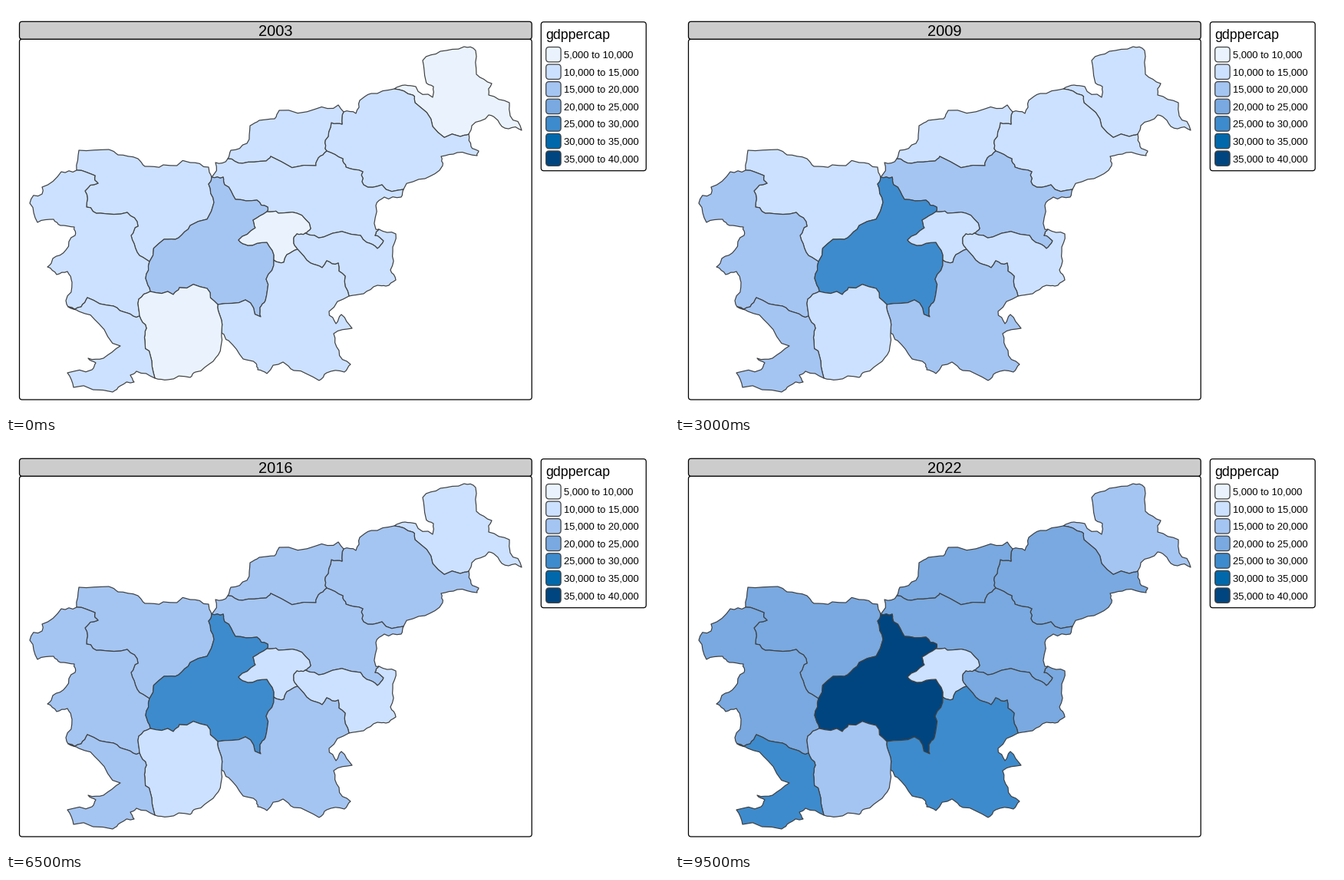
A matplotlib script that plays this animation: 864 by 533 pixels, repeating every 10000 ms.

```python
import numpy as np
import matplotlib.pyplot as plt
from matplotlib.animation import FuncAnimation
from matplotlib.patches import FancyBboxPatch, Polygon

W, H, DPI = 864, 533, 72  # at 72 dpi one point is one pixel
FIRST_YEAR, YEARS = 2003, 20
COLORS = ["#EAF3FD", "#CCE1FF", "#A4C5F2", "#79A9E0", "#3D8BCD", "#0068AB", "#00457F"]
LINE = "#404040"

plt.rcParams["font.family"] = "Liberation Sans"
plt.rcParams["text.hinting"] = "force_autohint"
rng = np.random.default_rng(4)
borders = []


def roughen(pts, levels=2, strength=0.09):
    """Fractal coastline: push the middle of every segment sideways."""
    for _ in range(levels):
        step = np.diff(pts, axis=0)
        sideways = step[:, ::-1] * (-1, 1)
        mid = pts[:-1] + step / 2 + sideways * rng.normal(0, strength, (len(step), 1))
        fine = np.empty((2 * len(pts) - 1, 2))
        fine[::2], fine[1::2] = pts, mid
        pts = fine
    return pts


def border(sides, *keys):
    """Line between two regions ('-' is abroad) through a few key points."""
    borders.append((sides, roughen(np.array(keys, float))))


def outline(region):
    """Chain all borders of a region into one ring."""
    parts = [pts for sides, pts in borders if region in sides]
    ring = parts.pop(0)
    while parts:
        for i, pts in enumerate(parts):
            if np.allclose(pts[-1], ring[-1]):
                pts = pts[::-1]
            if np.allclose(pts[0], ring[-1]):
                ring = np.vstack([ring, pts[1:]])
                del parts[i]
                break
        else:
            raise ValueError(f"open border around {region}")
    return ring


# Outer borders
border("A-", (506, 108), (520, 103), (534, 105), (556, 119), (557, 105), (547, 97),
       (543, 71), (566, 59), (597, 53), (612, 58), (613, 89), (633, 101), (629, 116),
       (656, 126), (657, 143), (672, 162), (655, 160), (641, 149), (629, 142),
       (607, 156), (603, 167))
border("B-", (603, 167), (606, 183), (616, 189), (614, 195), (588, 191), (567, 196),
       (569, 208), (546, 225), (518, 239))
border("B-", (440, 138), (456, 140), (461, 123), (476, 114), (506, 108))
border("C-", (289, 199), (293, 188), (314, 179), (318, 156), (330, 149), (350, 147),
       (356, 136), (404, 134), (433, 129), (440, 138))
border("D-", (268, 223), (273, 204), (289, 199))
border("D-", (518, 239), (515, 249), (493, 249), (482, 260), (482, 291), (486, 291))
border("E-", (92, 214), (95, 188), (134, 187), (146, 194), (172, 199), (181, 209),
       (205, 207), (240, 204), (264, 210), (268, 223))
border("F-", (81, 392), (78, 384), (86, 360), (80, 346), (66, 350), (54, 340),
       (61, 329), (78, 318), (90, 299), (89, 288), (71, 286), (62, 278), (41, 282),
       (31, 257), (47, 245), (47, 236), (72, 216), (92, 214))
border("I-", (486, 291), (508, 297), (504, 320), (501, 344), (508, 357), (495, 365),
       (484, 364), (466, 375), (447, 378))
border("J-", (447, 378), (421, 398), (430, 414), (437, 402), (451, 420), (427, 427),
       (434, 449), (449, 467), (441, 477), (418, 478), (408, 488), (375, 475),
       (361, 464), (340, 479), (328, 474), (326, 466), (309, 460), (290, 436), (281, 426))
border("K-", (281, 426), (280, 444), (270, 463), (247, 477), (240, 484), (211, 487),
       (194, 485))
border("L-", (194, 485), (170, 476), (162, 481), (167, 490), (149, 495), (139, 503),
       (88, 497), (80, 478), (112, 474), (117, 465), (107, 459), (127, 459), (149, 443),
       (121, 414), (95, 398), (81, 392))

# Inner borders
border("AB", (506, 108), (530, 116), (533, 126), (556, 157), (592, 170), (603, 167))
border("BD", (518, 239), (490, 233), (466, 233), (465, 216), (443, 210), (439, 199),
       (418, 189))
border("BC", (418, 189), (416, 175), (424, 152), (438, 154), (440, 138))
border("CD", (289, 199), (308, 205), (339, 202), (345, 196), (404, 208), (407, 198),
       (418, 189))
border("DG", (268, 223), (283, 223), (285, 233), (299, 252), (327, 253), (341, 262),
       (340, 268))
border("DH", (340, 268), (355, 270), (379, 270), (397, 290), (390, 296))
border("DI", (390, 296), (414, 301), (462, 299), (470, 308), (484, 316), (492, 306),
       (481, 299), (486, 291))
border("HI", (390, 296), (379, 297), (375, 306), (380, 317))
border("HJ", (380, 317), (366, 324), (362, 334), (349, 331))
border("GH", (340, 268), (322, 279), (325, 289), (303, 305), (315, 312), (340, 308),
       (349, 331))
border("IJ", (380, 317), (397, 335), (412, 341), (418, 332), (433, 335), (442, 352),
       (447, 378))
border("GJ", (349, 331), (339, 356), (338, 384), (331, 393), (332, 405), (312, 383),
       (276, 389))
border("JK", (281, 426), (279, 404), (276, 389))
border("GK", (188, 372), (218, 376), (226, 367), (262, 368), (276, 389))
border("FK", (188, 372), (173, 382), (174, 404))
border("KL", (174, 404), (183, 420), (181, 436), (188, 455), (194, 485))
border("FL", (81, 392), (98, 392), (106, 380), (140, 391), (158, 400), (174, 404))
border("EF", (92, 214), (116, 221), (120, 231), (103, 241), (105, 262), (123, 270),
       (158, 269), (172, 287), (163, 299), (171, 321), (187, 333))
border("EG", (268, 223), (264, 232), (271, 256), (240, 286), (225, 302), (206, 304),
       (187, 333))
border("FG", (187, 333), (182, 355), (188, 372))

# Class of each region in the first year, then the years it rises and falls by one
HISTORY = {
    "A": (0, [2006, 2019], []),
    "B": (1, [2008, 2014, 2021], [2009]),
    "C": (1, [2016, 2022], []),
    "D": (1, [2007, 2019, 2021], [2020]),
    "E": (1, [2008, 2013, 2019, 2021], [2009, 2020]),
    "F": (1, [2007, 2019, 2021], [2020]),
    "G": (2, [2005, 2007, 2018, 2022], []),
    "H": (0, [2004], []),
    "I": (1, [2017, 2022], []),
    "J": (1, [2006, 2017, 2022], []),
    "K": (0, [2004, 2017], []),
    "L": (1, [2005, 2008, 2017, 2022], [2009]),
}


def income_class(region, year):
    start, rises, falls = HISTORY[region]
    return start + sum(year >= y for y in rises) - sum(year >= y for y in falls)


fig = plt.figure(figsize=(W / DPI, H / DPI), dpi=DPI, facecolor="white")
ax = fig.add_axes([0, 0, 1, 1])
ax.set(xlim=(0, W), ylim=(H, 0))
ax.axis("off")


def box(x0, y0, x1, y1, fill="white", edge="black", radius=3.5):
    ax.add_patch(FancyBboxPatch((x0, y0), x1 - x0, y1 - y0, fc=fill, ec=edge, lw=1.25,
                                boxstyle=f"round,pad=0,rounding_size={radius}"))


box(17.5, 43.2, 685.2, 513)
box(17.5, 20.3, 685.2, 43.2, fill="#CCCCCC")
year_label = ax.text(351, 39, "", size=20, ha="center", va="baseline")

box(697.3, 20.8, 834.2, 214.7)
ax.text(703.5, 43, "gdppercap", size=17.8, va="baseline")
for k, color in enumerate(COLORS):
    y = 63.2 + 22.57 * k
    box(703.7, y - 9.7, 723.1, y + 9.7, color, LINE, 4)
    low = 5000 * (k + 1)
    ax.text(727.3, y + 4.5, f"{low:,} to {low + 5000:,}", size=13, va="baseline")

regions = {}
for name in HISTORY:
    regions[name] = ax.add_patch(
        Polygon(outline(name), closed=True, ec=LINE, lw=1.2, joinstyle="round"))


def update(i):
    year = FIRST_YEAR + i
    year_label.set_text(str(year))
    for name, patch in regions.items():
        patch.set_facecolor(COLORS[income_class(name, year)])
    return [year_label, *regions.values()]


anim = FuncAnimation(fig, update, frames=YEARS, interval=500, repeat=True, repeat_delay=0)
plt.show()
```
